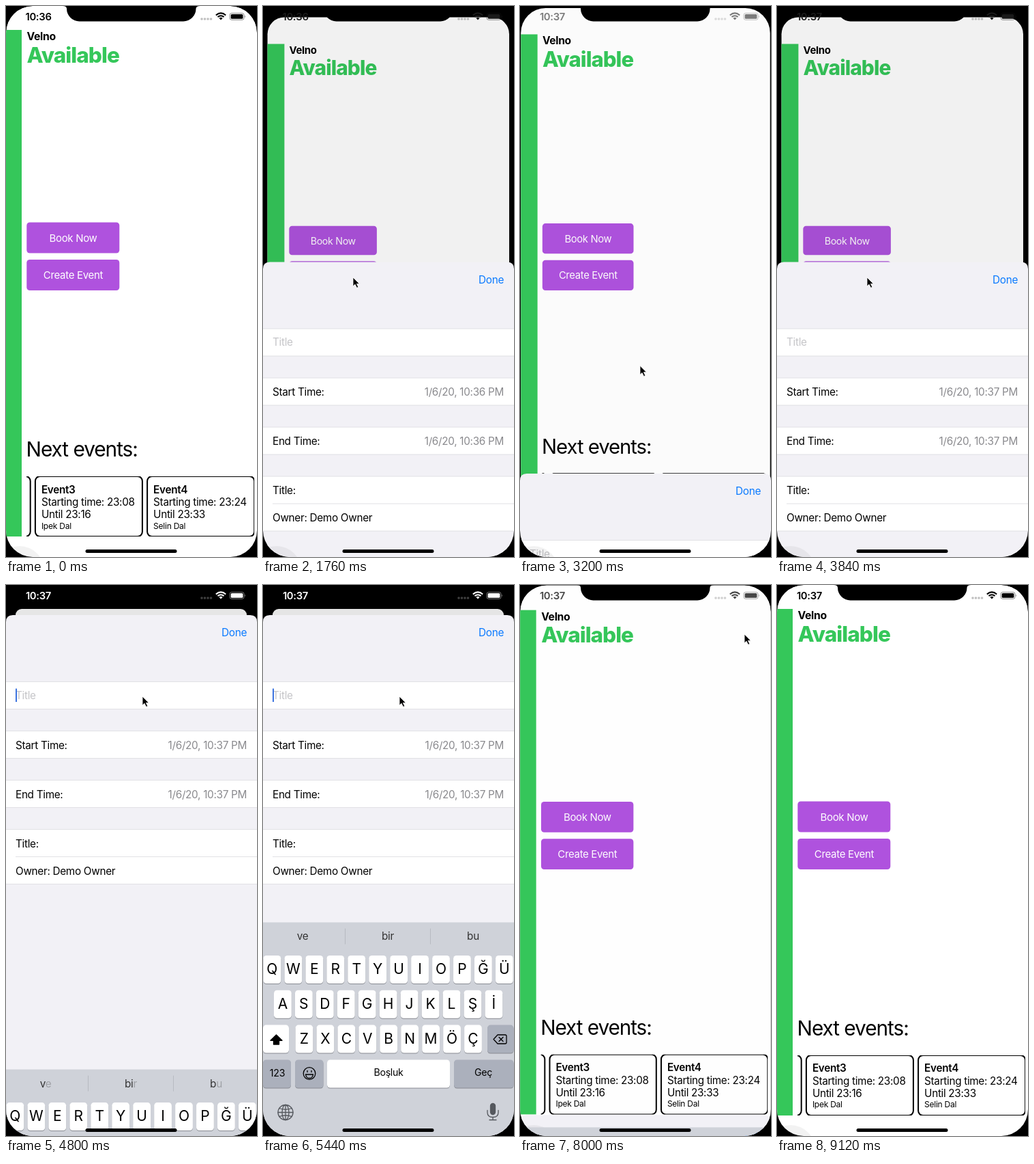
An HTML page for the animation above (9760 ms loop, 368 px wide and 806 px high).

```html
<!DOCTYPE html>
<html lang="en">
<head>
<meta charset="utf-8">
<title>Room booking</title>
<style>
html, body { margin: 0; width: 100%; height: 100%; overflow: hidden; background: #000; }
svg { display: block; width: 100%; height: 100%; }
text { font: 400 15.3px Inter, "Open Sans", sans-serif; letter-spacing: -.02em; white-space: pre; }
.mid { text-anchor: middle; }
.end { text-anchor: end; }
.bold { font-weight: 600; }
.room { font-size: 15.8px; font-weight: 700; }
.state { font-size: 31.5px; font-weight: 800; letter-spacing: -.03em; fill: #35c75a; }
.head { font-size: 29.8px; letter-spacing: -.035em; }
.small { font-size: 12px; }
.btn { font-size: 15px; fill: #fff; }
.clock { font-size: 14.8px; font-weight: 600; }
.date { fill: #8a8a8e; }
.key { font-size: 21px; letter-spacing: 0; text-anchor: middle; }
.fn { font-size: 14.2px; text-anchor: middle; }
.line { fill: none; stroke: currentColor; stroke-width: 1.3; stroke-linecap: round; stroke-linejoin: round; }
</style>
</head>
<body>
<svg viewBox="0 0 368 806">
  <defs>
    <clipPath id="screen"><rect width="368" height="806" rx="39"/></clipPath>
    <clipPath id="cardClip"><rect id="cardShape" height="900"/></clipPath>
    <clipPath id="rowClip"><rect x="30" y="688" width="334" height="88"/></clipPath>
  </defs>
  <rect width="368" height="806"/>
  <g clip-path="url(#screen)">
    <g clip-path="url(#cardClip)">
      <rect width="368" height="806" fill="#fff"/>
      <g id="home">
        <rect x="-20" y="35" width="43" height="741" fill="#35c75a"/>
        <text class="room" x="30.5" y="50">Velno</text>
        <text class="state" x="30.5" y="83">Available</text>
        <g fill="#af52de">
          <rect x="30.3" y="316.5" width="136" height="45" rx="4.5"/>
          <rect x="30.3" y="371" width="136" height="45" rx="4.5"/>
        </g>
        <text class="btn mid" x="98.5" y="345">Book Now</text>
        <text class="btn mid" x="98.5" y="399.3">Create Event</text>
        <text class="head" x="29.5" y="659">Next events:</text>
        <g id="events" clip-path="url(#rowClip)"></g>
      </g>
      <rect id="dim" width="368" height="806"/>
    </g>
    <path d="M83 0Q89 0 89 4A18.5 18.5 0 0 0 107.5 22.5H260A18.5 18.5 0 0 0 278.5 4Q278.5 0 285 0Z"/>
    <g id="sheet">
      <path d="M0 900V10Q0 0 10 0H358Q368 0 368 10V900Z" fill="#f2f1f6"/>
      <text class="end" x="353" y="31.3" fill="#0a7aff">Done</text>
      <g id="rows"></g>
      <text id="hint" x="14" y="122.5" fill="#c5c5c8">Title</text>
      <text id="typed" x="14" y="122.5"></text>
      <rect id="caret" y="107.5" width="2" height="19.5" fill="#3c74e0"/>
      <text x="14" y="195.5">Start Time:</text>
      <text class="date end" x="353" y="195.5"></text>
      <text x="14" y="267.5">End Time:</text>
      <text class="date end" x="353" y="267.5"></text>
      <text id="echo" x="14" y="339.5"></text>
      <text x="14" y="379.5">Owner: Demo Owner</text>
    </g>
    <circle cx="20" cy="826" r="36" opacity=".05"/>
    <g id="board">
      <rect width="368" height="320" fill="#cfd2d9"/>
      <g id="hints">
        <path d="M120.5 9V32M245.5 9V32" stroke="#b7bac1"/>
        <text class="mid" x="58" y="26" fill="#333">v<tspan>e</tspan></text>
        <text class="mid" x="183" y="26" fill="#333">bi<tspan>r</tspan></text>
        <text class="mid" x="308" y="26" fill="#333">b<tspan>u</tspan></text>
      </g>
      <text id="quote" class="fn" x="58" y="26"></text>
      <g id="keys"></g>
      <path id="shift" class="line" d="M19.5 164.5L28 172.8H23.5V178.5H15.5V172.8H11Z"/>
      <g class="line">
        <path d="M344 164.5H355Q357 164.5 357 166.5V175.5Q357 177.5 355 177.5H344L338 171ZM346 168L352 174M352 168L346 174"/>
        <circle cx="68" cy="221" r="8.8"/>
        <path d="M62.5 222.5H73.5Q72.5 228 68 228Q63.5 228 62.5 222.5ZM65 217V219M71 217V219"/>
      </g>
      <text class="fn" x="21" y="226">123</text>
      <text class="fn" x="184" y="225">Boşluk</text>
      <text class="fn" x="323" y="225">Geç</text>
      <g class="line" color="#55585e">
        <circle cx="33" cy="278" r="11"/>
        <ellipse cx="33" cy="278" rx="5" ry="11"/>
        <path d="M22 278H44M33 267V289M24 272Q33 275.5 42 272M24 284Q33 280.5 42 284"/>
        <path d="M329 275V278Q329 285 337 285Q345 285 345 278V275M337 285V289M332 289H342"/>
        <rect x="333.5" y="265" width="7" height="16" rx="3.5" fill="#55585e"/>
      </g>
    </g>
    <rect x="116.5" y="795" width="134" height="5" rx="2.5"/>
    <g id="status">
      <text id="clock" class="clock mid" x="47.5" y="20.6"></text>
      <g opacity=".25"><circle cx="287" cy="19" r="1.8"/><circle cx="291.5" cy="19" r="1.8"/><circle cx="296" cy="19" r="1.8"/><circle cx="300.5" cy="19" r="1.8"/></g>
      <path d="M315 20.5L312.4 17.8Q315 15.8 317.6 17.8Z"/>
      <g fill="none" stroke="currentColor" stroke-width="2">
        <path d="M307.8 13.4Q315 7.4 322.2 13.4M310.4 16.1Q315 12.3 319.6 16.1"/>
        <rect x="328" y="10.5" width="21" height="9.8" rx="2.8" stroke-width="1" opacity=".45"/>
      </g>
      <rect x="329.6" y="12" width="17.8" height="6.8" rx="1.5"/>
      <path d="M350.2 13.5Q352 15.4 350.2 17.3Z" opacity=".5"/>
    </g>
    <g id="pointer">
      <circle id="ring" cx="4" cy="7" r="16.8" fill="none" stroke="#000"/>
      <path d="M0 0V13L3 10.2L5.6 15.3L7.8 14.3L5.4 9.4H9.4Z" stroke="#fff" stroke-width=".8"/>
    </g>
  </g>
</svg>
<script>
const LOOP = 9760, STEP = 160;
const TRAVEL = 762;
const OPEN1 = 1600, DRAG = 2560, OPEN2 = 3680, TYPE = 4705, CLOSE = 7579;
const $ = id => document.getElementById(id);
const set = (el, attrs) => { for (const k in attrs) el.setAttribute(k, attrs[k]); return el; };
const add = (parent, tag, attrs, label = '') => {
  const el = set(document.createElementNS('http://www.w3.org/2000/svg', tag), attrs);
  el.textContent = label;
  return parent.appendChild(el);
};
const show = (el, on) => set(el, { visibility: on ? 'visible' : 'hidden' });

// Event cards; the first one is mostly scrolled away
[['Event2', '', '', ''],
 ['Event3', '23:08', '23:16', 'Ipek Dal'],
 ['Event4', '23:24', '23:33', 'Selin Dal']].forEach(([name, from, to, who], i) => {
  const x = -121.3 + 164.2 * i, g = $('events');
  add(g, 'rect', { x, y: 688, width: 157, height: 88, rx: 7, fill: '#fff', stroke: '#000', 'stroke-width': 2 });
  if (!i) return;
  add(g, 'text', { x: x + 9, y: 712.5, class: 'bold' }, name);
  add(g, 'text', { x: x + 9, y: 731 }, 'Starting time: ' + from);
  add(g, 'text', { x: x + 9, y: 749.3 }, 'Until ' + to);
  add(g, 'text', { x: x + 9, y: 764.5, class: 'small' }, who);
});

// Form rows
[[97, 40], [169, 40], [241, 40], [313, 80]].forEach(([y, height]) => {
  add($('rows'), 'rect', { x: -2, y: y + .5, width: 372, height, fill: '#fff', stroke: '#e1e1e5' });
});
add($('rows'), 'path', { d: 'M14 353.5H368', stroke: '#e1e1e5' });

// Keyboard
const letters = [];
const key = (x, y, width, fill = '#fff') => {
  add($('keys'), 'rect', { x, y: y + 1, width, height: 41, rx: 4.5, fill: '#898c93' });
  return add($('keys'), 'rect', { x, y, width, height: 41, rx: 4.5, fill });
};
[['qwertyuıopğü', .5], ['asdfghjklşi', 16], ['zxcvbnmöç', 47.5]].forEach(([row, x0], r) => {
  [...row].forEach((c, i) => {
    const x = x0 + 30.95 * i, y = 48.5 + 50.8 * r;
    key(x, y, 25.8);
    const el = add($('keys'), 'text', { x: x + 12.9, y: y + 27, class: 'key' });
    letters.push({ el, low: c, up: c.toLocaleUpperCase('tr') });
  });
});
const GREY = '#abb0bc';
const shiftKey = key(0, 150.1, 38, GREY);
key(329, 150.1, 38.5, GREY);
key(0, 201, 41, GREY);
key(47, 201, 41.5, GREY);
key(94, 201, 180);
key(280, 201, 87.5, GREY);

// Linear track through [time, value...] points
const track = (pts, t) => {
  if (t <= pts[0][0]) return pts[0].slice(1);
  for (let i = 1; i < pts.length; i++) {
    const a = pts[i - 1], b = pts[i];
    if (t <= b[0]) {
      const f = (t - a[0]) / (b[0] - a[0]);
      return a.slice(1).map((v, j) => v + (b[j + 1] - v) * f);
    }
  }
  return pts[pts.length - 1].slice(1);
};
// Critically damped spring from 0 to 1
const spring = ms => {
  const k = Math.max(0, ms) * 1.9 / 160;
  return 1 - (1 + k) * Math.exp(-k);
};

const pull = [[DRAG, 0], [2720, 14], [2880, 120], [3040, 330], [3200, 640], [3360, TRAVEL]];
const path = [
  [960, 8, 412], [1280, 110, 402], [1440, 132, 397], [1760, 132, 397], [2240, 194, 261],
  [DRAG, 194, 261], [2720, 194, 275], [2880, 196, 381], [3040, 198, 591], [3520, 132, 397],
  [4000, 132, 397], [4320, 200, 163], [6880, 200, 163], [7360, 329, 72], [8160, 329, 72],
  [8640, 213, 283], [8960, 10, 395]
];
const presses = [[1440, 1600], [2400, 3200], [3520, 3680], [4480, 4640], [7520, 7680]];

const sheetAt = t =>
  t < DRAG ? spring(t - OPEN1) :
  t < OPEN2 ? 1 - track(pull, t)[0] / TRAVEL :
  t < CLOSE ? spring(t - OPEN2) : 1 - spring(t - CLOSE);

function draw(t) {
  const p = sheetAt(t);
  const card = p ** 1.33, lead = 1 - (1 - p) ** 1.4;
  const falling = t >= CLOSE || (t >= DRAG && t < OPEN2);
  set($('cardShape'), { x: 14 * card, y: 35 * card, width: 368 - 29 * card, rx: 39 - 30 * card });
  set($('home'), { transform: `translate(${14 * lead} ${32.5 * lead}) scale(${1 - .079 * lead})` });
  set($('dim'), { opacity: .1 * p });
  set($('sheet'), { transform: `translate(0 ${44 + TRAVEL * (1 - p)})` });
  show($('sheet'), p > .0005);

  const tone = Math.round(255 * p ** (falling ? .4 : 4));
  const ink = `rgb(${tone},${tone},${tone})`;
  set($('status'), { fill: ink, color: ink });
  $('clock').textContent = t < 1920 ? '10:36' : '10:37';
  document.querySelectorAll('.date').forEach(el => {
    el.textContent = `1/6/20, 10:${t < 3520 ? 36 : 37} PM`;
  });

  const n = Math.max(0, Math.min(4, Math.floor((t - 5520) / 240)));
  const word = 'Test'.slice(0, n);
  $('typed').textContent = word;
  $('echo').textContent = 'Title: ' + word;
  $('quote').textContent = n ? `“${word}”` : '';
  show($('hint'), !n);
  show($('hints'), !n);
  set($('caret'), { x: 14 + (n ? $('typed').getComputedTextLength() : 0) });
  show($('caret'), t >= 4640 && t < 7680);

  const up = t < CLOSE ? spring(t - TYPE) : 1 - spring(t - CLOSE);
  set($('board'), { transform: `translate(0 ${806 - 313 * up})` });
  show($('board'), up > .0005);
  document.querySelectorAll('#hints tspan').forEach(el => set(el, { 'fill-opacity': up }));
  letters.forEach(k => { k.el.textContent = n ? k.low : k.up; });
  set(shiftKey, { fill: n ? GREY : '#fff' });
  $('shift').style.fill = n ? 'none' : '#000';

  const [x, y] = track(path, t);
  set($('pointer'), { transform: `translate(${x} ${y})` });
  const live = t >= 960 && t < 9120;
  show($('pointer'), live);
  show($('ring'), live && presses.some(([a, b]) => t >= a && t < b));
}

const start = performance.now();
function tick() {
  const t = (performance.now() - start) % LOOP;
  draw(Math.floor(t / STEP) * STEP);
  requestAnimationFrame(tick);
}
tick();
</script>
</body>
</html>
```
